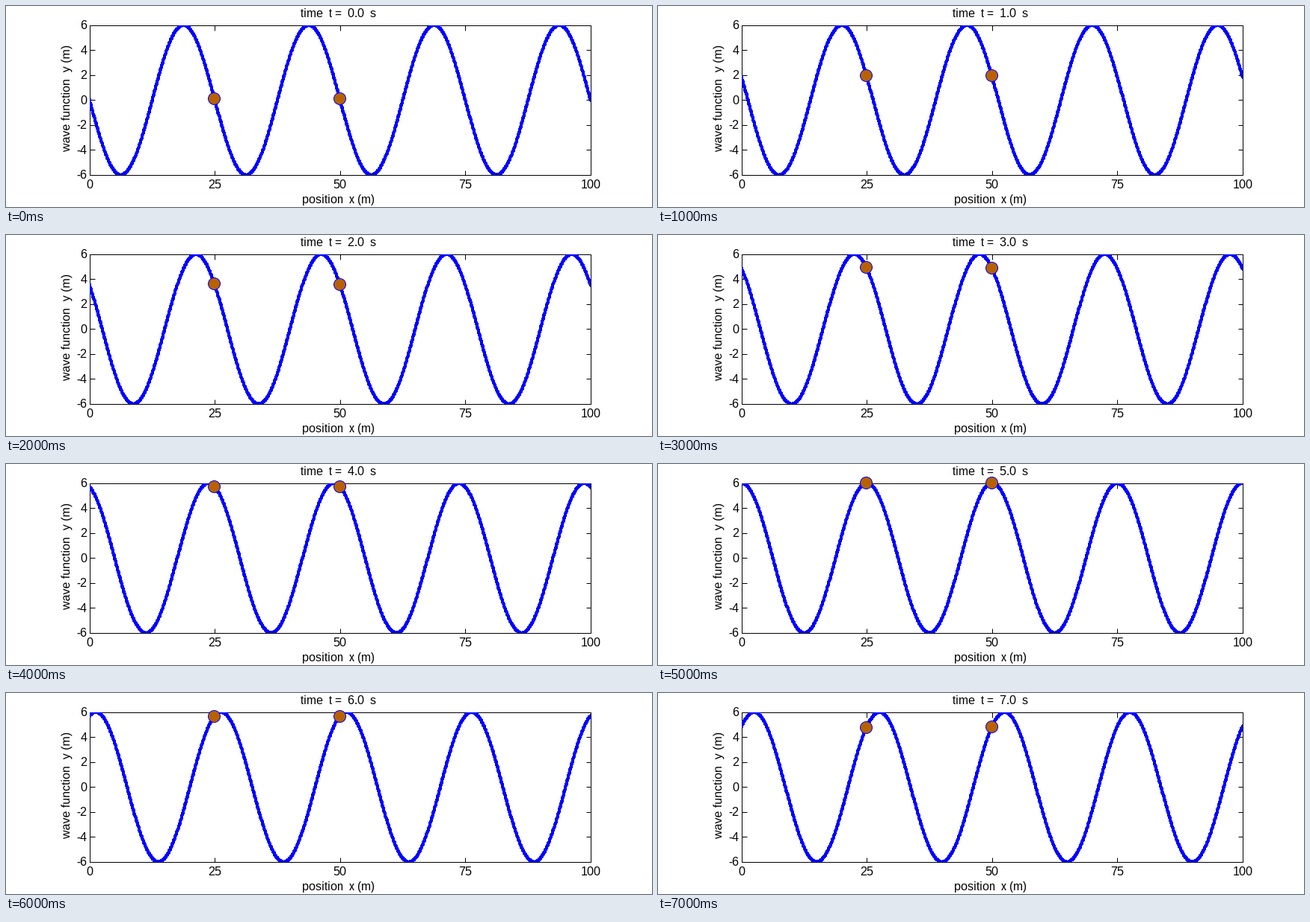
These frames come from a looping animation (864 by 270 pixels, 8 s). A matplotlib script:

```python
import numpy as np
import matplotlib.pyplot as plt
from matplotlib.animation import FuncAnimation
from matplotlib.patches import PathPatch
from matplotlib.textpath import TextPath
from matplotlib.transforms import Affine2D

W, H, DPI = 864, 270, 72
# Slightly under whole pixels, so that half-pixel ticks round down.
LEFT, RIGHT, TOP, BOTTOM = 111.8, 781.8, 25.8, 226.8
AMPLITUDE, WAVELENGTH, PERIOD = 6, 25, 20
SECONDS = 8

plt.rcParams.update({
    "font.family": "Liberation Sans",
    "font.size": 16,
    "text.hinting": "native",
    "text.hinting_factor": 1,
    "text.kerning_factor": 6,
})

fig = plt.figure(figsize=(W / DPI, H / DPI), dpi=DPI, facecolor="white")
ax = fig.add_axes([LEFT / W, 1 - BOTTOM / H, (RIGHT - LEFT) / W, (BOTTOM - TOP) / H])
ax.set(xlim=(0, 100), ylim=(-AMPLITUDE, AMPLITUDE),
       xticks=range(0, 101, 25), yticks=range(-6, 7, 2))
ax.tick_params(direction="in", length=6.5, width=1, top=True, right=True,
               labelbottom=False, labelleft=False)
for spine in ax.spines.values():
    spine.set_linewidth(1)


def label(x, y, text, ha="center"):
    """Put text with its baseline at pixel (x, y), measured from the top left."""
    return fig.text(x / W, 1 - y / H, text, ha=ha, va="baseline")


def upright_label(x, y, text):
    """Text running upwards from pixel (x, y), with unrounded letter spacing."""
    place = Affine2D().rotate_deg(90).translate(x, H - y)
    fig.add_artist(PathPatch(TextPath((0, 0), text, size=16), fc="black", lw=0,
                             transform=place))


for v in ax.get_xticks():
    label(LEFT + v / 100 * (RIGHT - LEFT), 245, f"{v:.0f}")
for v in ax.get_yticks():
    mid = (TOP + BOTTOM) / 2 - v / (2 * AMPLITUDE) * (BOTTOM - TOP)
    label(108.5, mid + 5.5, f"{v:.0f}", ha="right")
label(445, 265, "position  x (m)")
upright_label(85, 196, "wave function  y (m)")
title = label(445, 15, "")

x = np.linspace(0, 100, 1000)
marked = [249, 499]
wave, = ax.plot([], [], color="blue", lw=3.5, antialiased=False, snap=True, zorder=3)
dots, = ax.plot([], [], "o", ms=16, mfc=(0.72, 0.38, 0), mec="blue", mew=1,
                antialiased=False, clip_on=False, zorder=4,
                transform=ax.transData + Affine2D().translate(-0.6, 0.6))


def update(t):
    y = AMPLITUDE * np.sin(2 * np.pi * (t / PERIOD - x / WAVELENGTH))
    wave.set_data(x, y)
    dots.set_data(x[marked], y[marked])
    title.set_text(f"time  t =  {t:.1f}  s")
    return wave, dots, title


anim = FuncAnimation(fig, update, frames=SECONDS, interval=1000, repeat=True)
plt.show()
```
